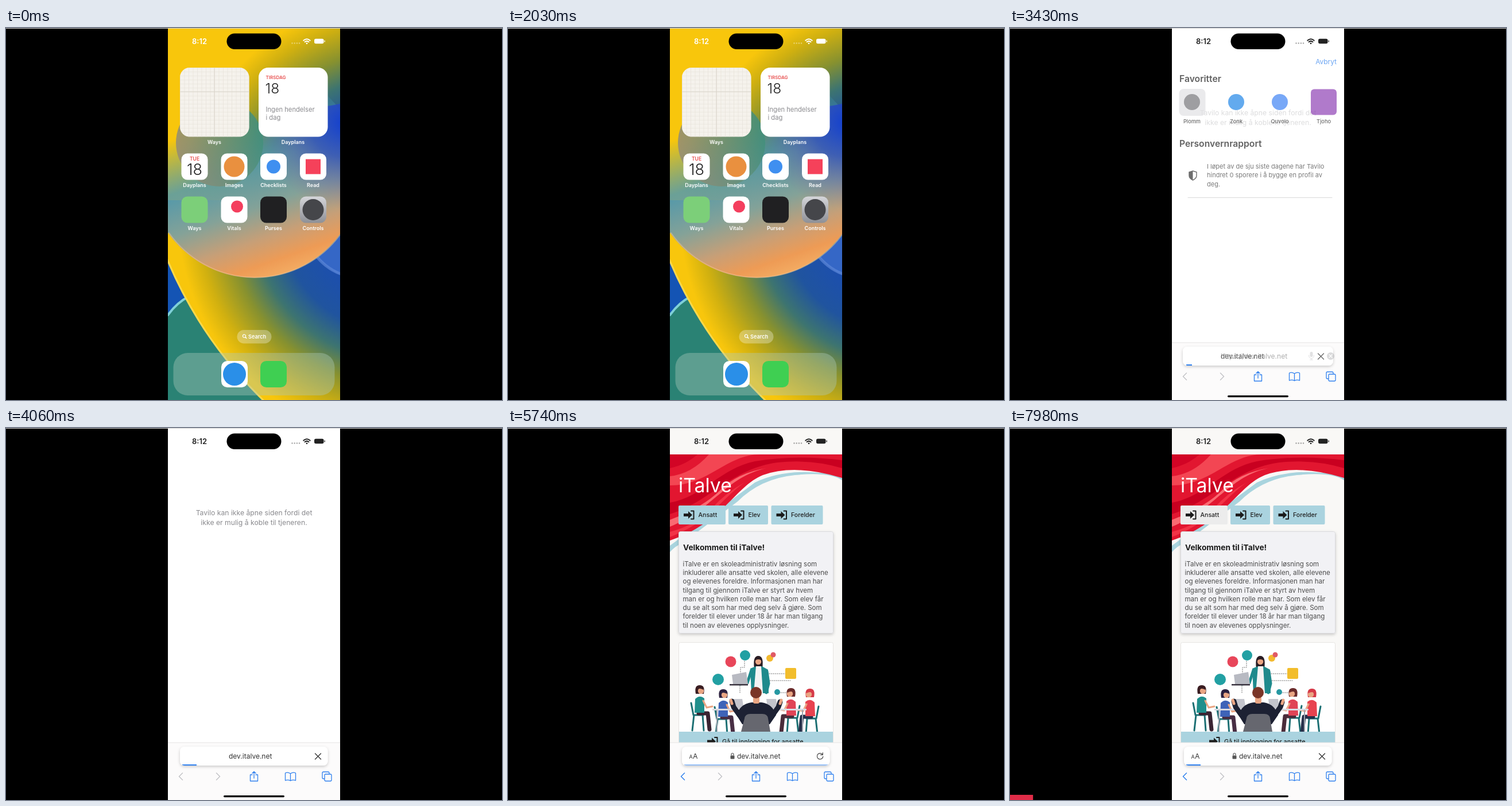
An HTML page for the animation above (8 s loop, 864 px wide and 648 px high).

```html
<!DOCTYPE html>
<html lang="no">
<head>
<meta charset="utf-8">
<title>Skoleportal på mobil</title>
<style>
  html, body { margin: 0; width: 100%; height: 100%; overflow: hidden; background: #000; }
  svg { display: block; width: 864px; height: 648px; font-family: Inter, Roboto, sans-serif; }
  .line { fill: none; stroke: currentColor; stroke-linecap: round; stroke-linejoin: round; }
</style>
</head>
<body>
<svg id="stage" viewBox="0 0 864 648">
  <defs>
    <clipPath id="phone"><rect x="282" y="1" width="300" height="647"/></clipPath>
    <clipPath id="web"><rect x="282" y="46" width="300" height="502"/></clipPath>
    <clipPath id="fieldClip"><rect id="fieldMask" y="555" height="33" rx="8"/></clipPath>
    <linearGradient id="sky"><stop offset="0" stop-color="#0d78cd"/><stop offset=".45" stop-color="#1485c2"/><stop offset="1" stop-color="#1b8084"/></linearGradient>
    <linearGradient id="wing"><stop offset="0" stop-color="#2b86b4" stop-opacity="0"/><stop offset=".55" stop-color="#2468bc"/><stop offset="1" stop-color="#1440c6"/></linearGradient>
    <linearGradient id="ball" x1=".3" y1="0" x2=".65" y2="1">
      <stop offset=".25" stop-color="#3a96b4" stop-opacity="0"/><stop offset=".48" stop-color="#5b9ca6" stop-opacity=".9"/>
      <stop offset=".66" stop-color="#84a298"/><stop offset=".8" stop-color="#c79f77"/><stop offset=".91" stop-color="#ee9b55"/><stop offset="1" stop-color="#f5b066"/>
    </linearGradient>
    <linearGradient id="moon" x1="0" y1=".6" x2="1" y2=".3"><stop offset="0" stop-color="#958b76"/><stop offset=".6" stop-color="#648f78"/><stop offset="1" stop-color="#3d8f7d"/></linearGradient>
    <radialGradient id="glow" gradientUnits="userSpaceOnUse" cx="590" cy="165" r="150">
      <stop offset="0" stop-color="#123fd0"/><stop offset=".4" stop-color="#3450b8" stop-opacity=".8"/><stop offset="1" stop-color="#8a6a98" stop-opacity="0"/>
    </radialGradient>
    <radialGradient id="gold" gradientUnits="userSpaceOnUse" cx="680" cy="330" r="400">
      <stop offset=".3" stop-color="#1b4db2"/><stop offset=".5" stop-color="#20549f"/><stop offset=".62" stop-color="#3d7470"/>
      <stop offset=".73" stop-color="#87912f"/><stop offset=".86" stop-color="#d0b010"/><stop offset=".95" stop-color="#f8c60c"/>
    </radialGradient>
    <linearGradient id="steel" x2="0" y2="1"><stop offset="0" stop-color="#d5d6da"/><stop offset="1" stop-color="#8e9096"/></linearGradient>
    <pattern id="grid" x="303" y="69" width="7.5" height="7" patternUnits="userSpaceOnUse"><path d="M0 0H7.5M0 0V7" stroke="#e4dfd6" stroke-width="1.2"/></pattern>
    <filter id="soft" x="-20%" y="-30%" width="140%" height="170%"><feDropShadow dx="0" dy="2" stdDeviation="2.5" flood-opacity=".2"/></filter>
  </defs>
</svg>
<script>
const LOOP = 8000, STEP = 70;
const HOST = "dev.italve.net", ADDRESS = "https://" + HOST;
const BLUE = "#2f80ee", BUTTON = "#aad3df", TEAL = "#1f8a8c", NAVY = "#1d2133", SKIN = "#e9a583";

const rect = (x, y, w, h, fill, rx = 0, more = "") =>
  `<rect x="${x}" y="${y}" width="${w}" height="${h}" rx="${rx}" fill="${fill}" ${more}/>`;
const dot = (x, y, r, fill, more = "") => `<circle cx="${x}" cy="${y}" r="${r}" fill="${fill}" ${more}/>`;
const shape = (d, fill, more = "") => `<path d="${d}" fill="${fill}" ${more}/>`;
const line = (d, color, width = 1.3, more = "") => `<path class="line" d="${d}" style="color:${color}" stroke-width="${width}" ${more}/>`;
const text = (x, y, size, str, fill = "#333", weight = 400, anchor = "start") =>
  `<text x="${x}" y="${y}" font-size="${size}" fill="${fill}" font-weight="${weight}" text-anchor="${anchor}">${str}</text>`;
const group = (id, body, more = "") => `<g id="${id}" ${more}>${body}</g>`;

// ---- home screen ----
function appIcon(x, y, name, fill, mark = "") {
  return rect(x - 23, y, 46, 46, fill, 10.5) + mark +
    (name && text(x, y + 58.3, 9, name, "#fff", 600, "middle"));
}
function homeScreen() {
  const wall =
    rect(282, 1, 300, 420, "url(#sky)") +
    shape("M425 124Q500 150 582 132V420H425Z", "url(#wing)") +
    line("M425 122Q500 148 582 128", "#3a9bc4", 4, 'opacity=".7"') +
    rect(282, 355, 300, 293, "#1454b4") +
    shape("M282 500Q300 477 320 467L460 648H282Z", "#2a8274") +
    line("M282 500Q298 478 318 468", "#7fd0d8", 4) +
    dot(965, 116, 742, "url(#gold)", 'stroke="#fbd84a" stroke-width="3"') +
    shape("M535 390Q556 418 582 430V340Z", "#3567c6") +
    line("M538 394Q556 418 582 428", "#5c86d8", 5, 'opacity=".7"') +
    shape("M282 300H582V360A184 184 0 0 1 284 358Z", "url(#sky)") +
    dot(433, 251, 184, "url(#ball)") +
    shape("M420 124Q500 150 582 132V340L433 330Z", "url(#glow)") +
    dot(372, 200, 76, "url(#moon)", 'opacity=".85"') +
    line("M284 357A184 184 0 0 0 582 360", "#f6c290", 2, 'opacity=".5"');
  const widgets =
    rect(303, 69, 120.5, 120.5, "#f5f2ec", 17) + rect(303, 69, 120.5, 120.5, "url(#grid)", 17) +
    line("M363 70V189M304 111H423", "#d9d4ca", 1) +
    rect(440, 69, 120.5, 120.5, "#fff", 17) +
    text(452.5, 89.3, 8, "TIRSDAG", "#e8504f", 600) +
    text(451.5, 113.5, 24.5, "18", "#222", 300) +
    text(452.5, 146, 11.2, "Ingen hendelser", "#8b8b8f") + text(452.5, 160, 11.2, "i dag", "#8b8b8f") +
    text(363, 202, 9, "Ways", "#fff", 600, "middle") + text(500, 202, 9, "Dayplans", "#fff", 600, "middle");
  const icons =
    appIcon(328.5, 218.5, "Dayplans", "#fff",
      text(328.5, 231, 8.6, "TUE", "#e8504f", 600, "middle") + text(328.5, 255.5, 27, "18", "#222", 300, "middle")) +
    appIcon(397.5, 218.5, "Images", "#fff", dot(397.5, 241.5, 18, "#e9903f")) +
    appIcon(466, 218.5, "Checklists", "#fff", dot(466, 241.5, 12, "#3f8ff0")) +
    appIcon(535, 218.5, "Read", "#fff", rect(522, 228.5, 26, 26, "#f5415a")) +
    appIcon(328.5, 293.5, "Ways", "#7ccf79") +
    appIcon(397.5, 293.5, "Vitals", "#fff", dot(402.5, 311, 10.5, "#f43f5e")) +
    appIcon(466, 293.5, "Purses", "#202022") +
    appIcon(535, 293.5, "Controls", "url(#steel)", dot(535, 316.5, 18.5, "#45464a"));
  const dock =
    rect(402.5, 526, 60, 23.5, "rgba(255,255,255,.3)", 11.7) +
    line("M418.2 540.2L416.6 538.6A2.6 2.6 0 1 1 417 538.2L419 540.5", "#fff", 1.2) +
    text(422, 541, 9.2, "Search", "#fff", 600) +
    rect(291.5, 566, 281, 74, "rgba(170,200,185,.4)", 25) +
    appIcon(398, 580, "", "#fff", dot(398, 603, 20, "#2a8fe8")) +
    appIcon(466, 580, "", "#3fcf52");
  return wall + widgets + icons + dock;
}

// ---- browser views ----
function favourites() {
  const tile = (x, name, mark) => mark + text(x, 166, 9.2, name, "#333", 500, "middle");
  return text(295, 94, 15.7, "Favoritter", "#222", 600) +
    tile(317, "Plomm", rect(294.5, 106, 46, 47, "#e2e2e5", 8) + dot(317, 129, 14, "#77777b")) +
    tile(394, "Zonk", dot(394, 129, 14, "#2488e8")) +
    tile(470, "Quvolo", dot(470, 129, 14, "#4285f4")) +
    tile(546.5, "Tjoho", rect(524, 106.5, 45, 45, "#9144b6", 6)) +
    text(295, 207, 15.7, "Personvernrapport", "#222", 600) +
    shape("M318.5 249L325 251V257Q325 262 318.5 265Q312 262 312 257V251Z", "none", 'stroke="#333" stroke-width="1.4"') +
    shape("M318.5 249V265Q312 262 312 257V251Z", "#333") +
    ["I løpet av de sju siste dagene har Tavilo", "hindret 0 sporere i å bygge en profil av", "deg."]
      .map((s, i) => text(343, 245 + i * 15.3, 11, s, "#444")).join("") +
    line("M310 295.5H561", "#ccc", 1);
}
function findView() {
  return rect(282, 1, 300, 547, "#f2f2f4") +
    text(432, 62.5, 12.4, "Søk", "#222", 600, "middle") +
    text(310, 105, 11.2, "På denne siden (ingen treff)", "#8a8a8e") +
    rect(294.5, 113, 275, 33.5, "#fff", 8) +
    line("M311 136H307.5Q306.5 136 306.5 135V124Q306.5 122.5 308 122.5H315Q316.5 122.5 316.5 124V129M309 126H314M309 129H311M315.5 134.5L317.5 136.5", "#444", 1.1) +
    dot(313.5, 132.5, 2.6, "none", 'stroke="#444" stroke-width="1.1"') +
    text(328, 134, 12.2, `Finn «${ADDRESS}»`);
}

// ---- illustration ----
const head = (x, y, hair, reach, turn = 0) =>
  shape(`M${x - 7} ${y + reach}Q${x - 10} ${y - 9} ${x} ${y - 9}Q${x + 10} ${y - 9} ${x + 7} ${y + reach}Z`, hair) +
  dot(x + turn, y + 1, 5.2, SKIN) +
  shape(`M${x - 6} ${y - 1}Q${x - 6} ${y - 8} ${x} ${y - 8}T${x + 6} ${y - 1}Q${x} ${y - 5} ${x - 6} ${y - 1}Z`, hair);
function sitter(x, y, dir, shirt, hair, legs) {
  const px = k => x + k * dir;
  return line(`M${px(-15)} ${y + 22}L${px(-11)} ${y + 43}H${px(6)}M${px(-10)} ${y + 43}L${px(-13)} ${y + 70}M${px(5)} ${y + 43}L${px(7)} ${y + 70}`, "#1b6f73", 3) +
    line(`M${px(-2)} ${y + 40}H${px(14)}L${px(17)} ${y + 68}`, legs, 7) +
    head(x, y, hair, 6, 2 * dir) +
    shape(`M${px(-8)} ${y + 15}Q${x} ${y + 7} ${px(8)} ${y + 14}L${px(8)} ${y + 39}H${px(-9)}Z`, shirt) +
    line(`M${px(6)} ${y + 18}L${px(12)} ${y + 30}L${px(22)} ${y + 28}`, SKIN, 3);
}
function meeting() {
  const laptop = x => shape(`M${x} 472h17l3 17h-18Z`, "#c4c5cd");
  return line("M412 406V417H405V428M404 449V462M455 428H484M456 440H492M475 461H487", "#777", 1, 'stroke-dasharray="1.5 2"') +
    dot(388, 407, 9.5, "#e8465a") + dot(413, 396, 9, "#22a0a3") + dot(366, 438, 10, "#22a0a3") +
    dot(456, 401, 6, "#f3b92f") + dot(462, 395, 4.5, "#e05a66") + rect(483, 418, 19, 19, "#f2bd2c", 2) + dot(469, 460, 5, "#2698a2") +
    head(436, 406, "#2a1d24", 13) +
    shape("M422 419L432 415H442L453 421L454 462H424Z", TEAL) + shape("M432 415H441L444 462H428Z", "#f4f4f4") +
    line("M424 422L417 444L404 446", TEAL, 5) + line("M451 424L454 445L450 461", TEAL, 5) +
    shape("M390 430L415 425L418 446H392Z", "#b8bac2") + rect(386, 446, 32, 2.5, "#3a3440") +
    sitter(334, 457, 1, "#1f8f8c", "#3a1d22", "#3a2432") + sitter(375, 464, 1, "#3e63b8", "#2d2140", "#482e44") +
    sitter(493, 462, -1, "#e04456", "#6a2b2b", "#4a2c3a") + sitter(526, 463, -1, "#e84350", "#d63a48", "#26304a") +
    laptop(391) + laptop(450) +
    rect(356, 489, 164, 3, "#d9dae2", 1) + line("M364 492V528M513 492V528", "#9ea2ad", 2) +
    line("M403 500L393 486L390 476M461 500L471 486L474 477", NAVY, 9) +
    line("M390 480L388 474M474 480L476 474", SKIN, 5) +
    shape("M398 500Q404 481 424 478H442Q461 481 467 500L456 516H408Z", NAVY) +
    rect(427, 468, 11, 12, SKIN, 3) + dot(432, 461, 10, "#7a3527") +
    shape("M412 506Q413 498 422 498H443Q452 498 453 506L457 529H406Z", "#66676f");
}

// ---- web page ----
const ENTER = x => shape(`M${x} 149h8v-4l7 6.5l-7 6.5v-4h-8Z`, "#1c1c1c") +
  line(`M${x + 13} 144.5h4.5v14h-4.5`, "#1c1c1c", 2);
function webButton(id, x, w, label) {
  return rect(x, 135, w, 33, BUTTON, 2, `id="${id}"`) + ENTER(x + 9) +
    text(x + 34.5, 155.3, 10.6, label, "#222", 500);
}
function webPage() {
  const banner =
    shape("M282 216Q292 205 305 200L400 128Q440 88 500 82T582 91V83Q490 66 430 95L282 205Z", "#a9d4de") +
    shape("M282 46H582V87Q500 62 444 82C395 102 375 165 282 196Z", "#e21630") +
    shape("M282 100C350 100 380 46 440 46H350Q320 80 282 84Z", "#f34653") +
    shape("M282 150C350 130 390 70 470 60Q530 54 582 70V56Q500 46 430 58C370 70 340 120 282 130Z", "#c90020") +
    shape("M282 172C360 140 380 85 450 70Q400 78 370 108T282 160Z", "#fa6a72") +
    shape("M282 190C350 165 375 120 412 95Q380 112 355 140T282 181Z", "#f23346") +
    shape("M282 46H330Q310 64 282 70Z", "#d20425");
  const lines = ["iTalve er en skoleadministrativ løsning som", "inkluderer alle ansatte ved skolen, alle elevene",
    "og elevenes foreldre. Informasjonen man har", "tilgang til gjennom iTalve er styrt av hvem",
    "man er og hvilken rolle man har. Som elev får", "du se alt som har med deg selv å gjøre. Som",
    "forelder til elever under 18 år har man tilgang", "til noen av elevenes opplysninger."];
  const card = rect(297.5, 180.5, 269, 177, "#f2f2f5", 3, 'stroke="#dadade" filter="url(#soft)"') +
    text(305, 213, 13.7, "Velkommen til iTalve!", "#1c1c1c", 700) +
    lines.map((s, i) => text(304.5, 241 + i * 15.22, 11.55, s, "#4c4c4c")).join("");
  const login = rect(297.5, 373.5, 269, 200, "#fff", 3, 'stroke="#e6e4e2"') + group("art", meeting()) +
    rect(298, 529, 268, 40, BUTTON) + `<g transform="translate(41 394.5)">${ENTER(306)}</g>` +
    text(373, 550, 10.8, "Gå til innlogging for ansatte", "#222", 500);
  return rect(282, 1, 300, 647, "#f9f8f6") +
    group("content",
      group("banner", banner) + text(297, 111.5, 33.8, "iTalve", "#fff") +
      rect(298, 135, 12, 15, "#aee2f5", 2, 'id="stub"') +
      group("buttons", webButton("staff", 297, 82, "Ansatt") + webButton("pupil", 384, 69, "Elev") + webButton("parent", 458.5, 90, "Forelder")) +
      group("card", card) + group("login", login), 'clip-path="url(#web)"');
}

// ---- bottom chrome ----
function chrome() {
  const tools = rect(282, 548, 300, 100, "#fcfbfb") + line("M282 548H582", "#e6e4e4", 1) +
    line("M307.5 601L301.5 607L307.5 613", "currentColor", 1.5, 'id="back"') +
    line("M366.5 601L372.5 607L366.5 613", "#c3c3c7", 1.5) +
    line("M429 604H425.5V615H438.5V604H435M432 610V598.5M428.8 601.5L432 598.5L435.2 601.5", BLUE) +
    line("M495.5 602Q491 599 486.5 601V614Q491 612 495.5 614.5Q500 612 504.5 614V601Q500 599 495.5 602V614", BLUE) +
    line("M554 611H553Q551 611 551 609V601Q551 599 553 599H561Q563 599 563 601V602M556 603H565Q567 603 567 605V613Q567 615 565 615H557Q555 615 555 613V604Z", BLUE);
  const clear = dot(552.5, 571.5, 6.5, "#707074") + line("M550 569L555 574M555 569L550 574", "#fff", 1.3);
  const mic = rect(516.5, 564, 5, 9, "#8a8a8e", 2.5) + line("M514.5 570Q514.5 575.5 519 575.5T523.5 570M519 575.5V578M516.5 578H521.5", "#8a8a8e", 1);
  return tools +
    group("desk", rect(282, 545, 300, 103, "#cfd0d7")) +
    rect(0, 555, 0, 33, "#fff", 8, 'id="field" filter="url(#soft)"') +
    group("full", text(0, 576, 12, ADDRESS)) + group("host", text(0, 576, 12, HOST)) +
    group("lock", rect(387.5, 570.5, 7, 6, "#555", 1) + line("M389 570V568.5Q389 566.5 391 566.5T393 568.5V570", "#555", 1.2) +
      text(315.5, 576, 9, "A", "#333") + text(322, 576, 12.3, "A", "#333")) +
    group("clear", mic + clear) +
    group("stop", line("M538.5 567L548.5 577M548.5 567L538.5 577", "#333", 1.3)) +
    group("reload", line("M548 569A5.2 5.2 0 1 0 548.8 572M548.3 565.5V569.3H544.5", "#444", 1.2)) +
    `<g clip-path="url(#fieldClip)">${rect(307, 586, 0, 2, BLUE, 0, 'id="load"')}</g>` +
    rect(343.3, 564, 1.8, 16, BLUE, .8, 'id="caret"') +
    rect(379, 640, 106, 3.2, "#000", 1.6);
}
function statusBar() {
  return `<g id="status" fill="currentColor">` + text(337, 28, 13, "8:12", "currentColor", 600, "middle") +
    `<g opacity=".4">${[498.5, 502.7, 506.9, 511].map(x => dot(x, 26.5, 1.2, "currentColor")).join("")}</g>` +
    line("M518.3 21.8Q524 16.8 529.7 21.8M520.6 24.3Q524 21.4 527.4 24.3", "inherit", 2) + dot(524, 26.8, 1.4, "currentColor") +
    rect(537, 18.7, 16.5, 8.6, "currentColor", 2.8) + rect(554.5, 21.5, 1.3, 3, "currentColor", .6) + "</g>" +
    rect(384.5, 9.5, 95, 27.5, "#000", 13.7);
}

document.getElementById("stage").insertAdjacentHTML("beforeend",
  rect(0, 0, 864, 648, "#000") + rect(0, 0, 864, 1, "#d4d4d4") +
  `<g clip-path="url(#phone)">` + group("home", homeScreen()) +
  group("browser", rect(282, 1, 300, 647, "#fff") +
    group("error", text(432, 152, 12.2, "Tavilo kan ikke åpne siden fordi det", "#8a8a8e", 400, "middle") +
      text(432, 169, 12.2, "ikke er mulig å koble til tjeneren.", "#8a8a8e", 400, "middle")) +
    group("favs", favourites()) + group("find", findView()) +
    group("cancel", text(569, 63, 11.9, "Avbryt", BLUE, 400, "end")) +
    group("page", webPage()) + chrome()) +
  statusBar() + "</g>" + rect(0, 639, 0, 9, "#e02c48", 0, 'id="ribbon"'));

// ---- motion ----
const parts = Object.fromEntries([...document.querySelectorAll("[id]")].map(e => [e.id, e]));
const set = (id, attrs) => { for (const k in attrs) parts[id].setAttribute(k, attrs[k]); };
const fade = (id, v) => { parts[id].style.display = v > 0 ? "" : "none"; parts[id].style.opacity = v; };
const mix = (a, b, k) => a + (b - a) * k;
const ramp = (t, a, b) => Math.min(1, Math.max(0, (t - a) / (b - a)));
const track = (t, keys) => keys.reduce((v, [at, to], i) => i ? mix(v, to, ramp(t, keys[i - 1][0], at)) : to, 0);

const CUT = 2170, GO = 3290, COMMIT = 4200, PAINT = 4690, STYLED = 4970, LOADED = 5600, TAP = 7000;

// home screen gives way to the search view in a hard cut
function drawScreens(t) {
  fade("home", +(t < CUT));
  fade("browser", +(t >= CUT));
  parts.status.style.color = t < CUT ? "#fff" : "#222";

  const swap = ramp(t, GO, 3770);
  fade("find", +(t < GO));
  fade("favs", 1 - swap);
  fade("cancel", 1 - swap);
  fade("error", swap);
}

function drawField(t) {
  const docked = 1 - (1 - ramp(t, GO, 3570)) ** 2;
  const committed = t >= COMMIT;
  const busy = t >= GO && t < LOADED || t >= TAP + 2 * STEP;

  const box = { x: mix(295, 303, docked), width: mix(275, 257.5, docked) };
  set("field", box);
  set("fieldMask", box);
  fade("desk", 1 - ramp(t, GO - STEP, 3430));

  const shift = { transform: `translate(${committed ? 399 : mix(304, 388, docked)})` };
  set("full", shift);
  set("host", shift);
  fade("full", Math.min(1, (1 - docked) * 1.6));
  fade("host", docked);
  fade("lock", +committed);
  set("clear", { transform: `translate(${8 * docked})` });
  fade("clear", 1 - docked);
  set("stop", { transform: `translate(${8 * (docked - 1)})` });
  fade("stop", busy ? docked : 0);
  fade("reload", +(t >= LOADED && !busy));
  fade("caret", t >= GO ? 0 : t < 2900 ? 1 - ramp(t, 2380, 2730) : ramp(t, 2870, 3150));
  parts.back.style.color = committed ? BLUE : "#c3c3c7";

  const again = t >= TAP;
  set("load", { width: again
    ? track(t, [[7140, 0], [7420, 25]])
    : track(t, [[3360, 0], [3430, 10], [3570, 25], [4130, 25], [4830, 51], [5040, 70], [LOADED, 254]]) });
  fade("load", again ? 1 : 1 - ramp(t, LOADED, 5880));
}

// the page arrives in stages
function drawPage(t) {
  const styled = +(t >= STYLED);
  fade("page", ramp(t, 4130, 4410));
  fade("content", +(t >= PAINT));
  fade("stub", 1 - styled);
  fade("buttons", styled);
  fade("banner", +(t >= STYLED + STEP));
  fade("login", styled);
  fade("art", +(t >= STYLED + 3 * STEP));
  set("card", { transform: `translate(0 ${styled ? 0 : -18.3})` });
  set("staff", { fill: t >= TAP ? "#ececec" : BUTTON });
  set("ribbon", { width: Math.max(0, (t - 7210) / STEP * 3.65) });
}

function tick(now) {
  const t = Math.floor(now % LOOP / STEP) * STEP;
  drawScreens(t);
  drawField(t);
  drawPage(t);
  requestAnimationFrame(tick);
}
tick(0);
</script>
</body>
</html>
```
